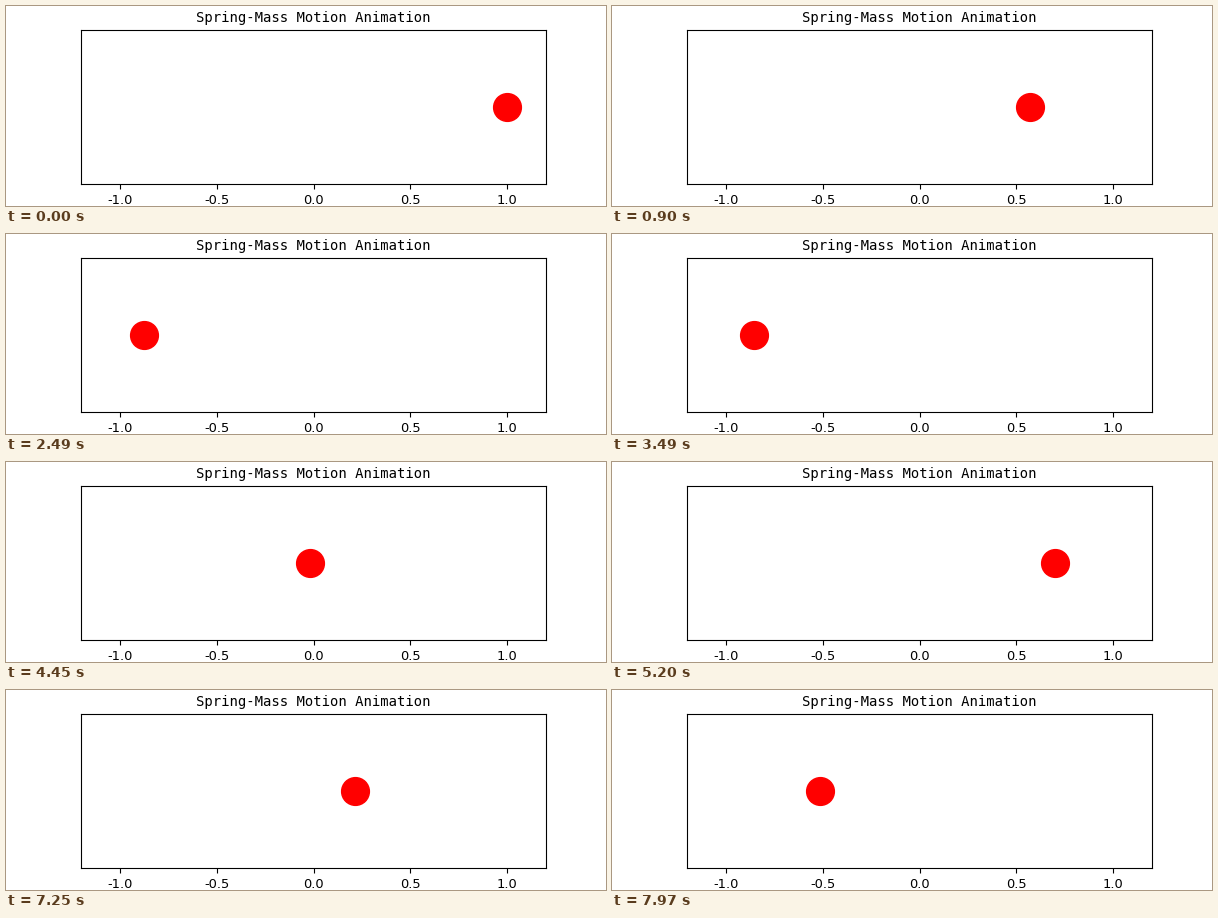
A matplotlib script for the animation above (8000 ms loop, 600 by 200 pixels).

```python
import numpy as np
import matplotlib.pyplot as plt
from matplotlib.animation import FuncAnimation

LOOP_MS = 8000
INTERVAL_MS = 20
STEP_MS = 30
PHASE_STEP = np.sqrt(10) * 0.01   # omega = sqrt(k / m), dt = 0.01 s
PAUSES_MS = (3060, 6040)          # 10 ms pause near each turning point


def position(t):
    """Displacement of the mass at t milliseconds."""
    paused = 10 * sum(t >= pause for pause in PAUSES_MS)
    step = (t - paused) // STEP_MS
    return np.cos((step + 0.5) * PHASE_STEP)


fig, ax = plt.subplots(figsize=(6, 2), dpi=100)
fig.subplots_adjust(left=0.125, right=0.9, bottom=0.11, top=0.88)
ax.set_xlim(-1.2, 1.2)
ax.set_ylim(-0.5, 0.5)
ax.set_yticks([])
ticks = np.arange(-1, 1.1, 0.5)
ax.set_xticks(ticks, [f"{x:.1f}" for x in ticks],
              fontname="DejaVu Sans", fontsize=9.4)
ax.tick_params(axis="x", pad=4)
ax.set_title("Spring-Mass Motion Animation",
             fontname="DejaVu Sans Mono", fontsize=10)

mass, = ax.plot([1], [0], "ro", markersize=20)


def update(frame):
    mass.set_data([position(frame * INTERVAL_MS + INTERVAL_MS // 2)], [0])
    return mass,


anim = FuncAnimation(fig, update, frames=LOOP_MS // INTERVAL_MS,
                     interval=INTERVAL_MS, repeat=True, repeat_delay=0)
plt.show()
```
